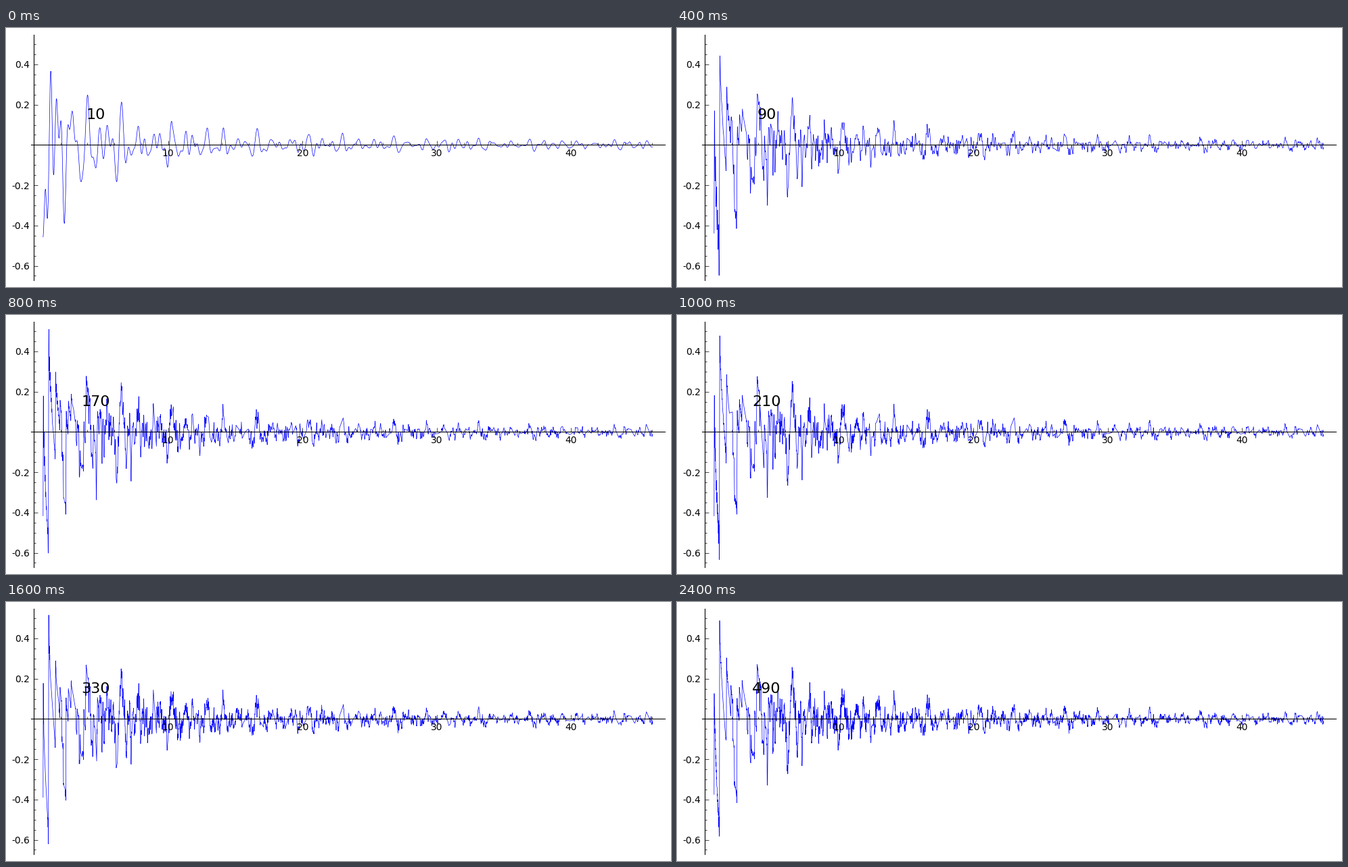
A matplotlib script for the animation above (2.6 s loop, 983 px wide and 384 px high).

```python
import numpy as np
import matplotlib.pyplot as plt
from matplotlib.animation import FuncAnimation
from matplotlib.ticker import FixedLocator, FuncFormatter

# Oscillating term (2/t) * sum sin(g t)/g over the zeros 1 + ig of the
# L-function of the elliptic curve y^2 + y = x^3 - x (conductor 37).

W, H, DPI = 983, 384, 100
CONDUCTOR = 37
COUNTS = range(10, 491, 40)
T_MIN, T_MAX = np.log(2), np.log(1e20)


def smallest_factor(n):
    return next((d for d in range(2, int(n ** 0.5) + 1) if n % d == 0), n)


def trace(p):
    """Coefficient a_p, by counting points modulo p."""
    if p == 2:
        return -2
    squares = {y * y % p for y in range(1, p)}
    values = ((4 * x ** 3 - 4 * x + 1) % p for x in range(p))
    return -sum(0 if v == 0 else 1 if v in squares else -1 for v in values)


def coefficients(size):
    a = [0, 1]
    traces = {}
    for n in range(2, size + 1):
        p = smallest_factor(n)
        if p == n:
            traces[p] = trace(p)
        m = n // p
        value = traces[p] * a[m]
        if m % p == 0 and p != CONDUCTOR:
            value -= p * a[m // p]
        a.append(value)
    return np.array(a[1:], float)


def l_zeros(count, height=340, tilt=0.05, step=0.005, size=2 ** 19):
    """Positive zeros from the Mellin integral along a tilted ray."""
    a = coefficients(800)
    n = np.arange(1, len(a) + 1)
    z = np.exp(np.arange(0, 7, step) + 1j * (np.pi / 2 - tilt))
    g = z * (np.exp(-2 * np.pi / np.sqrt(CONDUCTOR) * np.outer(z, n)) @ a)
    g[0] /= 2
    t = 2 * np.pi / (step * size) * np.arange(size)
    values = np.fft.ifft(g, size).imag[t < height]
    t = t[t < height]
    i = np.flatnonzero((values[:-1] * values[1:] < 0) & (t[:-1] > 1))
    share = values[i] / (values[i] - values[i + 1])
    return (t[i] + share * (t[1] - t[0]))[:count]


def wave(t, zeros):
    return 2 / t * (np.sin(np.outer(t, zeros)) @ (1 / zeros))


def sample(zeros, points=200, depth=5):
    """Split intervals whose midpoint lies off the chord."""
    t = np.linspace(T_MIN, T_MAX, points)
    y = wave(t, zeros)
    tolerance = 0.01 * (t[1] - t[0])
    all_t, all_y = [t], [y]
    t0, t1, y0, y1 = t[:-1], t[1:], y[:-1], y[1:]
    for _ in range(depth):
        tm = (t0 + t1) / 2
        ym = wave(tm, zeros)
        k = np.abs((y0 + y1) / 2 - ym) > tolerance
        all_t.append(tm[k])
        all_y.append(ym[k])
        t0, t1 = np.r_[t0[k], tm[k]], np.r_[tm[k], t1[k]]
        y0, y1 = np.r_[y0[k], ym[k]], np.r_[ym[k], y1[k]]
    t, y = np.concatenate(all_t), np.concatenate(all_y)
    order = np.argsort(t)
    return t[order], y[order]


# The central zero at height 0 is counted but adds no term.
ZEROS = l_zeros(COUNTS[-1] - 1)
CURVES = [sample(ZEROS[:count - 1]) for count in COUNTS]

plt.rcParams.update({"font.family": "DejaVu Sans", "axes.unicode_minus": False})
fig = plt.figure(figsize=(W / DPI, H / DPI), dpi=DPI, facecolor="white")
ax = fig.add_axes([36.8 / W, 9.8 / H, 936.9 / W, 364.4 / H])
margin = 0.02 * (T_MAX - T_MIN)
ax.set_xlim(T_MIN - margin, T_MAX + margin)
ax.set_ylim(-0.6725, 0.548)
ax.set_axisbelow(False)

for side in ("top", "right"):
    ax.spines[side].set_visible(False)
for side in ("left", "bottom"):
    ax.spines[side].set_position(("data", 0))
    ax.spines[side].set_linewidth(0.8)


def set_ticks(axis, major, minor, label):
    axis.set_major_locator(FixedLocator(major))
    axis.set_minor_locator(FixedLocator(minor))
    axis.set_major_formatter(FuncFormatter(lambda v, _: label % v))


set_ticks(ax.xaxis, [10, 20, 30, 40],
          [v for v in range(2, 47, 2) if v % 10], "%d")
set_ticks(ax.yaxis, [-0.6, -0.4, -0.2, 0.2, 0.4],
          [k / 20 for k in range(-13, 11) if k % 4], "%.1f")
ax.tick_params(which="major", direction="in", length=4, width=0.5,
               pad=4, labelsize=10)
ax.tick_params(which="minor", direction="in", length=2, width=0.5)

line, = ax.plot([], [], color="#0000ff", lw=0.5)
counter = ax.text(np.log(100), 0.15, "", fontsize=16, ha="center", va="center")


def update(frame):
    line.set_data(*CURVES[frame])
    counter.set_text(str(COUNTS[frame]))
    return line, counter


anim = FuncAnimation(fig, update, frames=len(COUNTS), interval=200,
                     repeat=True, repeat_delay=0)
plt.show()
```
